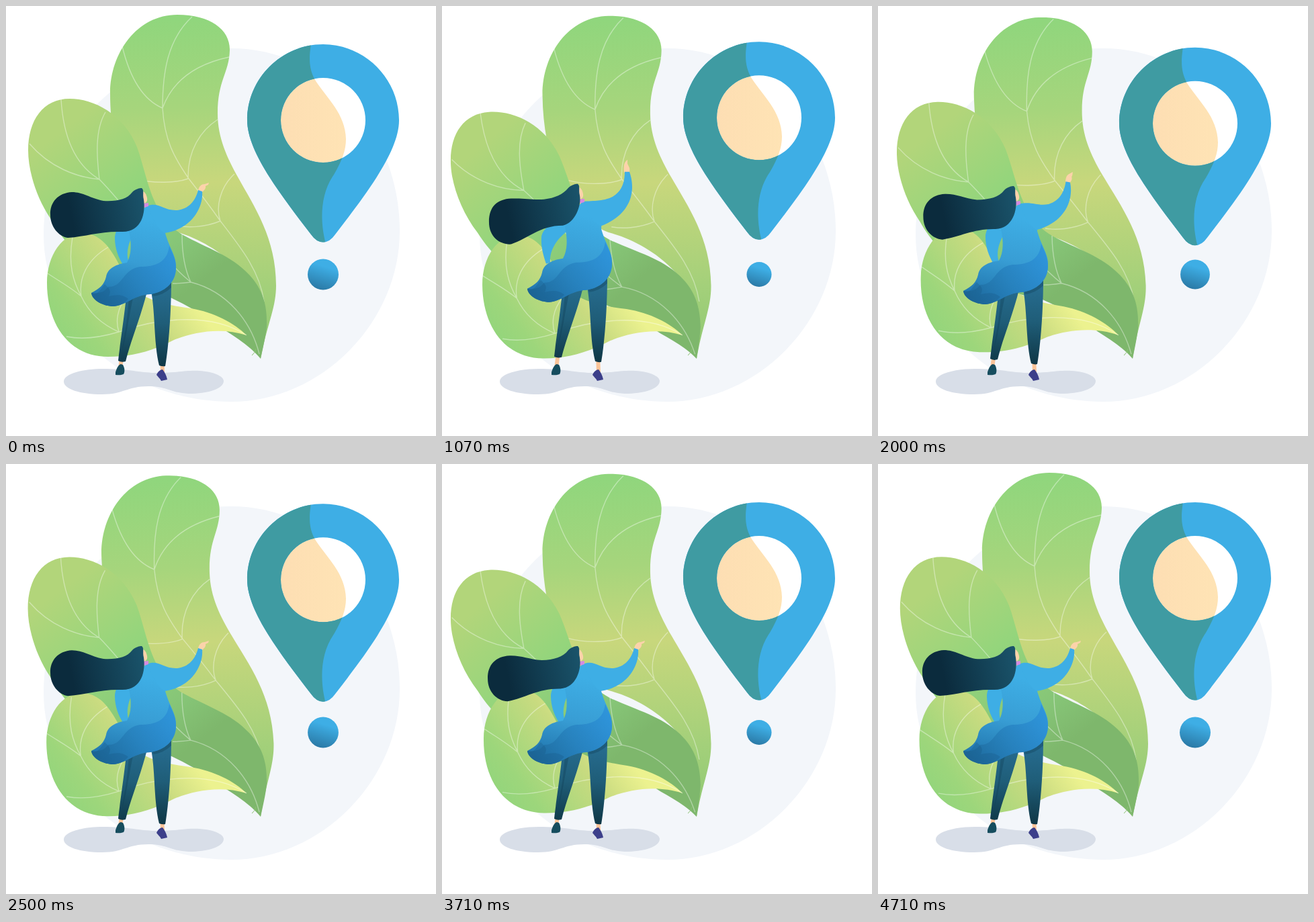
These frames come from a looping animation (640x640 px, 4780 ms). An HTML page:

```html
<!DOCTYPE html>
<html lang="en">
<head>
<meta charset="utf-8">
<title>Location</title>
<style>
  html, body { margin: 0; width: 100%; height: 100%; overflow: hidden; background: #fff; }
  svg { display: block; width: 100%; height: 100%; }
  .veins { fill: none; stroke: #fff; stroke-opacity: .38; stroke-width: 1.4; }
</style>
</head>
<body>
<svg viewBox="0 0 640 640">
  <defs>
    <linearGradient id="tallFill" gradientUnits="userSpaceOnUse" x1="240" y1="13" x2="255" y2="525">
      <stop offset="0" stop-color="#8fd67d"/><stop offset=".27" stop-color="#a6d57c"/>
      <stop offset=".49" stop-color="#c8d77c"/><stop offset=".8" stop-color="#a3d07a"/><stop offset="1" stop-color="#8fc873"/>
    </linearGradient>
    <linearGradient id="wideFill" gradientUnits="userSpaceOnUse" x1="90" y1="140" x2="330" y2="460">
      <stop offset=".08" stop-color="#b2d57a"/><stop offset=".4" stop-color="#94d57c"/>
      <stop offset=".68" stop-color="#86c577"/><stop offset=".84" stop-color="#7eb76c"/>
    </linearGradient>
    <linearGradient id="limeFill" gradientUnits="userSpaceOnUse" x1="70" y1="480" x2="230" y2="360">
      <stop offset="0" stop-color="#93d57c"/><stop offset=".2" stop-color="#9dd67b"/>
      <stop offset=".65" stop-color="#c9db80"/><stop offset=".95" stop-color="#ecf28f"/>
    </linearGradient>
    <linearGradient id="hairFill" gradientUnits="userSpaceOnUse" x1="85" y1="315" x2="205" y2="290">
      <stop offset=".1" stop-color="#0b2b3d"/><stop offset="1" stop-color="#1a536a"/>
    </linearGradient>
    <linearGradient id="coatFill" gradientUnits="userSpaceOnUse" x1="220" y1="305" x2="185" y2="448">
      <stop offset=".1" stop-color="#3eaee5"/><stop offset=".55" stop-color="#389dd4"/><stop offset="1" stop-color="#1f73ab"/>
    </linearGradient>
    <linearGradient id="hemFill" gradientUnits="userSpaceOnUse" x1="135" y1="440" x2="252" y2="380">
      <stop offset="0" stop-color="#1d6898"/><stop offset=".5" stop-color="#2680bd"/><stop offset="1" stop-color="#2b90da"/>
    </linearGradient>
    <linearGradient id="pantsFill" gradientUnits="userSpaceOnUse" x1="0" y1="410" x2="0" y2="536">
      <stop offset="0" stop-color="#286f94"/><stop offset=".5" stop-color="#1f5d78"/><stop offset="1" stop-color="#0f3746"/>
    </linearGradient>
    <linearGradient id="dotFill" x1=".65" y1="0" x2=".35" y2="1">
      <stop offset=".25" stop-color="#3eaee5"/><stop offset="1" stop-color="#2a78a4"/>
    </linearGradient>
    <linearGradient id="peachFill">
      <stop offset="0" stop-color="#fddeb3"/><stop offset="1" stop-color="#ffe5b5"/>
    </linearGradient>
    <path id="pinShape" fill-rule="evenodd" d="M472 57C534 57 585 108 585 170C585 215 540 275 490 340Q482 351.5 472 351.5Q462 351.5 454 340C404 275 359 215 359 170C359 108 410 57 472 57ZM535 170A63 63 0 1 0 409 170A63 63 0 1 0 535 170Z"/>
    <clipPath id="pinLeft">
      <path d="M300 40L457 40C450 75 450 92 460 110C478 138 505 160 506 198C506 215 500 230 488 251C466 282 468 325 476 354L300 360Z"/>
    </clipPath>
  </defs>

  <path fill="#f3f6fa" d="M56 340C56 187 181 63 335 63C474 63 586 185 586 335C586 470 470 589 335 589C181 589 56 478 56 340Z"/>
  <path fill="#d8dee8" d="M86 559C86 546 120 539 150 540C190 541 205 547 232 546C260 545 270 542 288 543C308 544 324 551 324 558C324 570 300 577 272 577C245 576 240 566 212 566C180 566 175 578 143 578C110 578 86 570 86 559Z"/>

  <g id="tall">
    <path fill="url(#tallFill)" d="M255 13C305 13 334 36 333 66C332 100 315 110 315 160C315 250 402 300 402 416C402 450 388 475 379 525L384 470C380 412 320 354 250 335C190 310 155 230 155 130C155 70 195 13 255 13Z"/>
    <path class="veins" d="M277 16C240 50 233 100 233 152C236 200 250 225 272 257C290 280 305 300 319 320C350 360 378 395 384 440M173 60C185 110 205 140 233 152M332 76C290 85 250 105 233 152M315 169C290 185 270 215 271 257M192 257C220 265 255 263 271 257M340 250C318 270 312 300 319 320M319 320C295 330 270 330 255 327"/>
  </g>
  <g id="wide">
    <path fill="url(#wideFill)" d="M95 138C130 138 175 160 195 210C210 250 215 312 262 340C300 361 335 371 362 400C385 425 389 450 388 478C386 495 382 510 379 525C365 508 345 495 328 484C300 462 272 447 245 434C150 415 95 370 66 316C45 285 33 245 33 215C33 170 55 138 95 138Z"/>
    <path class="veins" d="M82 139C85 190 100 235 139 258M35 205C65 240 105 255 139 258M148 158C132 185 135 225 139 258C190 310 225 370 275 411C330 425 365 470 377 518M262 340C262 365 265 390 275 411M248 413C258 413 268 412 275 411"/>
  </g>
  <path fill="none" stroke="#8cc274" d="M366 520Q371 516 372 510"/>
  <g id="lime">
    <path fill="url(#limeFill)" d="M115 338C160 340 168 400 195 425C215 440 245 446 275 450C310 456 340 472 358 490C320 478 280 485 250 497C215 515 185 522 152 522C95 522 61 475 61 412C61 370 85 337 115 338Z"/>
    <path class="veins" d="M99 344C92 385 100 410 112 432M62 398C80 410 95 418 112 432M152 359C120 378 108 405 112 432C125 460 145 475 168 485C215 468 300 452 358 490M90 492C115 497 145 492 168 485M180 432C165 450 163 470 168 485"/>
  </g>

  <g id="pin">
    <circle cx="472" cy="170" r="64" fill="#fff"/>
    <circle cx="472" cy="170" r="64" fill="url(#peachFill)" clip-path="url(#pinLeft)"/>
    <use href="#pinShape" fill="#3eaee5"/>
    <use href="#pinShape" fill="#3f9ba2" clip-path="url(#pinLeft)"/>
  </g>
  <circle id="dot" cx="472" cy="399.5" fill="url(#dotFill)"/>

  <path stroke="#fbc499" stroke-width="6" d="M173 515L170 540M232 518L233 546"/>
  <path fill="#164d5e" d="M163 549L163 545C165 539 167 534 171 533L174 534C177 539 177 545 175 548C170 550 166 549 163 549Z"/>
  <path fill="#3c3f8a" d="M224 549C226 544 230 541 233 541C237 546 239 551 240 556L231 558C229 554 226 552 224 549Z"/>
  <g id="body">
    <path fill="url(#pantsFill)" d="M180 420C178 450 170 500 167 528Q172 531 178 529C185 500 200 465 210 425ZM214 415C223 450 219 500 228 535Q233 537 237 536C243 500 246 450 246 408Z"/>
    <path fill="#0f3d55" opacity=".35" d="M183 430C182 460 176 495 172 515C180 490 183 460 190 430ZM218 428C230 426 240 420 246 411L246 419C238 427 228 431 219 432Z"/>
    <path id="backArm" fill="#3eaee5"/>
    <path fill="url(#coatFill)" d="M188 318L210 297C222 297 240 320 237 338C243 360 254 372 253 390C253 412 235 426 215 429C190 430 180 445 160 447C145 447 128 438 127 427C140 420 146 415 149 403C151 390 165 384 180 382C187 370 187 352 183 336Z"/>
    <path fill="url(#hemFill)" opacity=".8" d="M243 357C240 382 222 388 200 388C172 392 176 418 152 418C146 426 140 428 127 427C128 438 145 447 160 447C180 445 190 430 215 429C235 426 253 412 253 390C253 375 247 368 243 357Z"/>
    <path fill="#174f7e" opacity=".25" d="M127 427C138 432 140 421 147 414C152 420 158 422 153 432C163 430 172 428 182 436C173 445 165 447 160 447C145 447 128 438 127 427Z"/>
    <path id="hand" fill="#fcd3aa"/>
    <path id="frontArm" fill="#3eaee5"/>
    <path fill="#d58be0" d="M203 294L212 293L212 298L206 300Z"/>
    <path fill="#fcd3aa" d="M200 275C207 275 209 281 210 286C211 291 208 294 203 294Z"/>
    <path id="hair" fill="url(#hairFill)"/>
  </g>
</svg>
<script>
  const LOOP = 4780;
  const [tall, wide, lime, pin, dot, body, hair, hand, frontArm, backArm] =
    ['tall', 'wide', 'lime', 'pin', 'dot', 'body', 'hair', 'hand', 'frontArm', 'backArm']
      .map(id => document.getElementById(id));

  // Two poses per part: at rest, and fully raised or blown.
  const poses = {
    hand: ['M286 275C287 268 291 265 296 265L302 263L301 266L297 268C298 272 294 275 291 278Z',
           'M271 254C270 245 271 241 273 238L276 235L276 241L278 245C280 248 279 251 279 254Z'],
    frontArm: ['M212 297C228 292 234 305 255 304C272 302 282 290 286 274L292 276C294 300 276 332 236 338C225 330 215 315 212 297Z',
               'M212 297C232 296 240 296 252 291C268 283 272 268 272 253L279 253C288 278 285 315 236 334C225 328 215 315 212 297Z'],
    backArm: ['M190 320C170 322 163 332 162 345C162 362 168 375 174 385L183 382C179 372 180 358 188 342Z',
              'M190 320C165 328 150 336 148 350C147 365 151 378 155 390L161 388C160 372 168 355 188 340Z'],
    hair: ['M202 271C206 274 203 280 205 288C208 308 202 337 172 336C140 335 120 343 92 345C78 343 66 328 66 311C65 292 78 278 98 277C115 277 125 286 145 290C165 291 180 288 188 277C193 272 199 271 202 271Z',
           'M202 271C206 274 203 280 205 288C208 303 198 329 180 333C145 333 128 353 103 361C86 362 70 350 70 328C70 305 82 294 103 293C122 292 132 295 152 294C168 292 180 287 188 277C193 272 199 271 202 271Z']
  };

  const ease = k => (1 - Math.cos(Math.PI * Math.min(1, Math.max(0, k)))) / 2;
  const ramp = (t, from, to) => ease((t - from) / (to - from));
  const rotate = (el, angle, x, y) => el.setAttribute('transform', `rotate(${angle} ${x} ${y})`);
  const morph = (el, [a, b], k) => {
    const target = b.match(/\d+/g);
    let i = 0;
    el.setAttribute('d', a.replace(/\d+/g, n => +n + (target[i++] - n) * k));
  };

  function draw(t) {
    const phase = 2 * Math.PI * t / LOOP;
    const slow = (1 - Math.cos(phase)) / 2;
    const sway = (1 - Math.cos(2 * phase)) / 2;
    const lift = ramp(t, 200, 950) - ramp(t, 1620, 2350);
    const elbow = ramp(t, 200, 950) - ramp(t, 1250, 2250);
    const bob = -6.5 * ramp(t, 0, 800) + 11.7 * ramp(t, 800, 1650) - 5.2 * ramp(t, 1700, 3200);

    rotate(tall, -1.9 * slow, 379, 525);
    rotate(wide, -3.9 * sway, 379, 525);
    rotate(lime, -2.2 * Math.sin(2 * phase), 358, 490);
    pin.setAttribute('transform', `translate(0 ${bob})`);
    body.setAttribute('transform', `translate(0 ${-6.2 * lift})`);
    dot.setAttribute('r', 23 - 4.6 * sway);
    morph(hand, poses.hand, lift);
    morph(frontArm, poses.frontArm, lift);
    morph(backArm, poses.backArm, elbow);
    morph(hair, poses.hair, .53 * sway + .47 * lift);
  }

  const start = performance.now();
  function tick() {
    draw((performance.now() - start) % LOOP);
    requestAnimationFrame(tick);
  }
  tick();
</script>
</body>
</html>
```
